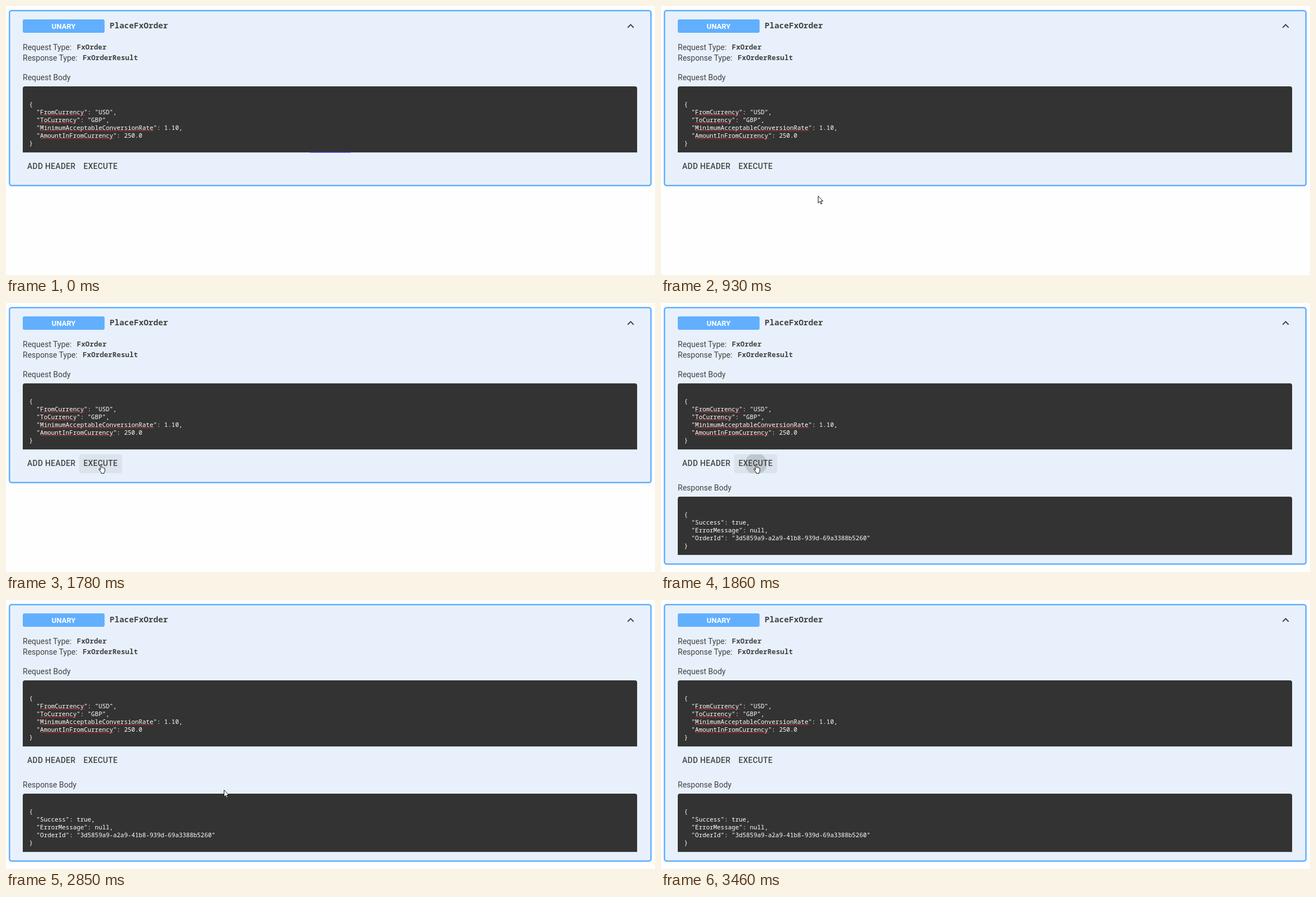
An HTML page for the animation above (4550 ms loop, 1162x482 px).

```html
<!DOCTYPE html>
<html lang="en">
<head>
<meta charset="utf-8">
<title>PlaceFxOrder</title>
<style>
  html, body { margin: 0; width: 100%; height: 100%; overflow: hidden; background: #fefefe; }
  svg { display: block; }
  text { font: 14px Roboto, sans-serif; fill: #424242; white-space: pre; }
  .mono { font: 700 12.7px "Noto Sans Mono", monospace; }
  .title { font-size: 14.5px; }
  .code text { font: 10.9px "Noto Sans Mono", monospace; fill: #fff; }
  .btn { font-size: 13.8px; font-weight: 500; letter-spacing: .36px; }
  .chip { font-size: 13px; font-weight: 700; fill: #fff; text-anchor: middle; }
  .squiggle { fill: none; stroke: #e0302c; stroke-width: .9; }
  .cursor { fill: #fff; stroke: #111; stroke-linejoin: round; }
  #ibeam { fill: none; stroke: #fff; mix-blend-mode: difference; }
</style>
</head>
<body>
<svg width="1162" height="482" viewBox="0 0 1162 482">
  <clipPath id="btnClip"><rect x="131" y="271" width="77" height="34" rx="4"/></clipPath>
  <rect width="1162" height="482" fill="#fefefe"/>
  <rect id="card" x="6.2" y="8.2" width="1148.6" height="313.6" rx="4" fill="#e8f1fb" stroke="#61affe" stroke-width="2.5"/>

  <rect x="30" y="24" width="146.5" height="24" rx="3" fill="#61affe"/>
  <text class="chip" x="103.2" y="40.5">UNARY</text>
  <text class="mono title" x="185.5" y="40.3">PlaceFxOrder</text>
  <path transform="translate(1106.4 24)" fill="#424242" d="M12 8l-6 6 1.41 1.41L12 10.83l4.59 4.58L18 14z"/>

  <text x="30" y="78.5">Request Type:</text>
  <text class="mono" x="126.8" y="77.7">FxOrder</text>
  <text x="30" y="98">Response Type:</text>
  <text class="mono" x="137.2" y="97.2">FxOrderResult</text>

  <text x="30" y="133">Request Body</text>
  <g id="request" class="code"></g>
  <rect id="focus" x="544" y="261.5" width="73" height="1.5" fill="#594ae2"/>

  <g clip-path="url(#btnClip)">
    <rect id="hover" x="131" y="271" width="77" height="34"/>
    <circle id="ripple" cx="170" cy="288"/>
  </g>
  <text class="btn" x="38" y="292.3">ADD HEADER</text>
  <text class="btn" x="138.8" y="292.3">EXECUTE</text>

  <g id="result">
    <text x="30" y="336">Response Body</text>
    <g id="response" class="code"></g>
    <rect id="underline" x="30" y="449.8" width="1100" height="2" fill="#120d10"/>
  </g>

  <path id="arrow" class="cursor" d="M.4 .5V13L3.4 10.2 5.4 14.8 7.3 14 5.3 9.5H9Z"/>
  <path id="hand" class="cursor" d="M3.6 10.5V1.6a1.1 1.1 0 0 1 2.2 0V6.2q1-.8 1.9.3q1.1-.6 1.8.5q2-.4 2 1.4V11.5q0 2-1.4 3.5V16.6H5.2V15.2Q3.5 13.5 1 9.8Q.3 8.3 1.6 8.1Q2.6 8.2 3.6 10.5Z"/>
  <path id="ibeam" d="M-3-6H-1Q0-6 0-5Q0-6 1-6H3M0-5V5M-3 6H-1Q0 6 0 5Q0 6 1 6H3"/>
</svg>
<script>
const LOOP = 4550, CHAR = 6.54, LINE = 13.9;
const $ = id => document.getElementById(id);

function add(parent, tag, attrs, text = "") {
  const el = document.createElementNS("http://www.w3.org/2000/svg", tag);
  for (const k in attrs) el.setAttribute(k, attrs[k]);
  el.textContent = text;
  parent.append(el);
}

// Dark code panel; spell-check squiggles go under property names if asked
function panel(id, top, bottom, lines, spell) {
  const g = $(id);
  add(g, "path", { d: `M30 ${bottom}V${top + 4}q0-4 4-4H1126q4 0 4 4V${bottom}z`, fill: "#333" });
  add(g, "rect", { x: 30, y: bottom - 1, width: 1100, height: 1, fill: "#000", opacity: .35 });
  lines.forEach((line, i) => {
    const y = top + 36 + i * LINE;
    add(g, "text", { x: 41.5, y }, line);
    const word = spell && line.match(/"(\w+)":/);
    if (!word) return;
    let d = `M${41.5 + 3 * CHAR} ${y + 2.3}`;
    for (let x = 0; x < word[1].length * CHAR - 2; x += 4) d += "l2-1.3 2 1.3";
    add(g, "path", { class: "squiggle", d });
  });
}

panel("request", 144, 262.3, [
  "{", '  "FromCurrency": "USD",', '  "ToCurrency": "GBP",',
  '  "MinimumAcceptableConversionRate": 1.10,', '  "AmountInFromCurrency": 250.0', "}"
], true);
panel("response", 347, 451.3, [
  "{", '  "Success": true,', '  "ErrorMessage": null,',
  '  "OrderId": "3d5859a9-a2a9-41b8-939d-69a3388b5260"', "}"
], false);

// [start ms, values...], each held until the next row
const pointer = [
  [0, ""],
  [460, "arrow", 905, 467], [540, "arrow", 795, 441], [620, "arrow", 655, 407],
  [700, "arrow", 515, 379], [770, "arrow", 400, 359], [850, "arrow", 320, 346],
  [930, "arrow", 281, 340], [1000, "arrow", 215, 322], [1070, "arrow", 168, 309],
  [1310, "hand", 166.5, 294.5], [1390, "hand", 165.5, 290.5], [1560, "hand", 165.5, 288.7],
  [2690, "hand", 188, 290], [2770, "arrow", 270, 316], [2850, "arrow", 390, 340],
  [2920, "ibeam", 520.5, 372], [3000, "ibeam", 650.5, 400], [3080, "ibeam", 755.5, 425],
  [3160, "ibeam", 810.5, 445], [3230, "ibeam", 829.5, 453],
  [3310, "arrow", 835, 462], [3380, "arrow", 839, 474], [3460, ""]
];
const hover = [[0, 0], [1310, .03], [1390, .045], [1560, .055], [2690, .035], [2770, .015], [2850, 0]];
const ripple = [[0, 0, 0], [1860, 19.5, .13], [1920, 50, .08], [2390, 50, .015], [2690, 0, 0]];

const at = (rows, t) => rows.findLast(r => r[0] <= t);
const show = (id, on) => $(id).setAttribute("visibility", on ? "visible" : "hidden");

function draw(t) {
  const [, kind, x, y] = at(pointer, t);
  for (const id of ["arrow", "hand", "ibeam"]) show(id, id === kind);
  if (kind) $(kind).setAttribute("transform", `translate(${x} ${y})`);

  $("hover").setAttribute("opacity", at(hover, t)[1]);
  const [, r, alpha] = at(ripple, t);
  $("ripple").setAttribute("r", r);
  $("ripple").setAttribute("opacity", alpha);

  const done = t >= 1860;
  $("result").style.display = done ? "" : "none";
  $("card").setAttribute("height", done ? 459.6 : 313.6);
  show("focus", t < 70);
  show("underline", t >= 2920 && t < 3310);
}

const start = performance.now();
function tick() {
  draw((performance.now() - start) % LOOP);
  requestAnimationFrame(tick);
}
tick();
</script>
</body>
</html>
```
